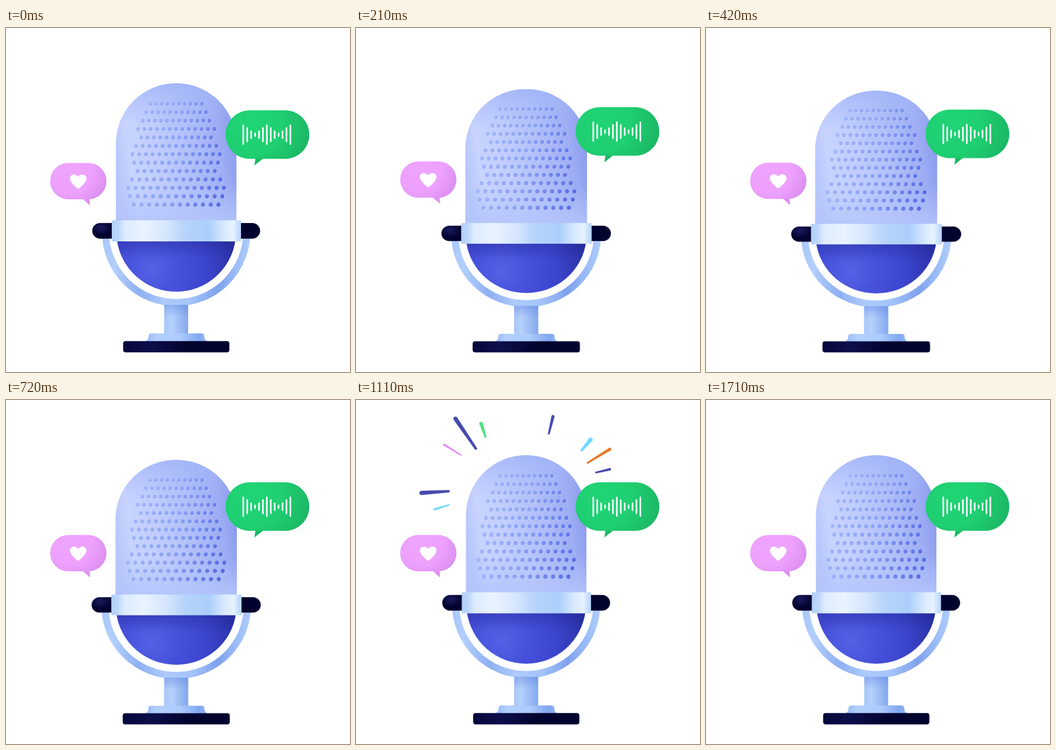
Recreate the animation shown at these times as an HTML page. Size 748 by 748 pixels, loop 1740 ms.

```html
<!DOCTYPE html>
<html lang="en">
<head>
<meta charset="utf-8">
<title>Microphone</title>
<style>
  html, body { margin: 0; width: 100%; height: 100%; overflow: hidden; background: #fff; }
  svg { display: block; width: 100vw; height: 100vh; }
  .mic, .bubble, .drift, .burst { animation: 1740ms linear infinite; }
  .mic { transform-origin: 370px 705px; animation-name: squash; }
  .bubble { animation-name: hop; }
  .drift, .burst { transform-origin: 370px 218px; }
  .drift { animation-name: drift; }
  .burst { animation-name: burst; }

  @keyframes squash {
    0% { transform: scale(1, 1); }
    15.517% { transform: scale(1.0127, .9726); }
    39.655% { transform: scale(1.0127, .9726); animation-timing-function: cubic-bezier(.3333, .6667, .6667, 1); }
    48.276%, 100% { transform: scale(1, 1); }
  }
  @keyframes hop {
    0%, 8.621% { transform: none; animation-timing-function: ease-in-out; }
    17.241% { transform: translateY(var(--hop)); animation-timing-function: ease-in-out; }
    25.862%, 100% { transform: none; }
  }
  @keyframes drift {
    0%, 41.379% { transform: scale(.876); animation-timing-function: cubic-bezier(.3333, .6667, .6667, 1); }
    100% { transform: scale(1.084); }
  }
  @keyframes burst {
    0%, 41.378% { transform: scale(.35); opacity: 0; }
    41.379% { transform: scale(.35); opacity: 1; animation-timing-function: cubic-bezier(.2, .7, .4, 1); }
    53.448%, 77.586% { transform: scale(1); opacity: 1; }
    97.701%, 100% { transform: scale(1); opacity: 0; }
  }
</style>
</head>
<body>
<svg viewBox="0 0 748 748" xmlns="http://www.w3.org/2000/svg">
  <defs>
    <linearGradient id="body" x1="0" y1=".58" x2="1" y2=".42">
      <stop offset="0" stop-color="#b7c7fc"/><stop offset=".12" stop-color="#c8d4ff"/>
      <stop offset=".34" stop-color="#c1cdfe"/><stop offset=".62" stop-color="#b0bff9"/>
      <stop offset=".86" stop-color="#9eadf4"/><stop offset="1" stop-color="#8b9bee"/>
    </linearGradient>
    <linearGradient id="bodyEnds" x2="0" y2="1">
      <stop offset="0" stop-color="#9fb3f8" stop-opacity=".7"/><stop offset=".3" stop-color="#a9bafa" stop-opacity="0"/>
      <stop offset=".72" stop-color="#b4c5fb" stop-opacity="0"/><stop offset="1" stop-color="#b4c5fb" stop-opacity=".85"/>
    </linearGradient>
    <linearGradient id="dot" gradientUnits="userSpaceOnUse" x1="262" x2="478" y1="250" y2="290">
      <stop offset="0" stop-color="#a5b9f9"/><stop offset=".5" stop-color="#8da3f4"/><stop offset="1" stop-color="#5a6de8"/>
    </linearGradient>
    <linearGradient id="band">
      <stop offset="0" stop-color="#b3cff9"/><stop offset=".05" stop-color="#bcd7fb"/>
      <stop offset=".1" stop-color="#deecff"/><stop offset=".25" stop-color="#eaf4ff"/>
      <stop offset=".42" stop-color="#d6e6fe"/><stop offset=".56" stop-color="#b8d5fb"/>
      <stop offset=".75" stop-color="#abcffa"/><stop offset=".88" stop-color="#dcecff"/>
      <stop offset=".94" stop-color="#e6f3ff"/><stop offset="1" stop-color="#b4d3fa"/>
    </linearGradient>
    <radialGradient id="bowl" gradientUnits="userSpaceOnUse" cx="315" cy="525" r="185">
      <stop offset="0" stop-color="#5462e6"/><stop offset=".35" stop-color="#4650da"/>
      <stop offset=".65" stop-color="#3c45cd"/><stop offset="1" stop-color="#2a31a6"/>
    </radialGradient>
    <linearGradient id="bowlShade" x2="0" y2="1">
      <stop offset="0" stop-color="#20278f" stop-opacity=".4"/><stop offset=".35" stop-color="#20278f" stop-opacity="0"/>
    </linearGradient>
    <linearGradient id="fork" gradientUnits="userSpaceOnUse" x1="209" x2="531" y1="0" y2="0">
      <stop offset="0" stop-color="#a9c7fa"/><stop offset=".08" stop-color="#b3cffc"/>
      <stop offset=".25" stop-color="#8fb0f2"/><stop offset=".42" stop-color="#aecbfc"/>
      <stop offset=".6" stop-color="#a5c4fa"/><stop offset=".78" stop-color="#7fa2ee"/>
      <stop offset=".92" stop-color="#9fc0f8"/><stop offset="1" stop-color="#b0cefc"/>
    </linearGradient>
    <linearGradient id="stem">
      <stop offset="0" stop-color="#a8c6f9"/><stop offset=".3" stop-color="#b6d1fc"/>
      <stop offset=".7" stop-color="#9abaf5"/><stop offset="1" stop-color="#84a7ee"/>
    </linearGradient>
    <linearGradient id="stemShade" x2="0" y2="1">
      <stop offset="0" stop-color="#5f87e4" stop-opacity=".45"/><stop offset=".4" stop-color="#5f87e4" stop-opacity="0"/>
    </linearGradient>
    <linearGradient id="foot">
      <stop offset="0" stop-color="#94b5f5"/><stop offset=".2" stop-color="#b3d0fd"/>
      <stop offset=".55" stop-color="#adccfc"/><stop offset=".85" stop-color="#82a7f0"/><stop offset="1" stop-color="#9bbcf7"/>
    </linearGradient>
    <radialGradient id="knob" cx=".4" cy=".28" r=".5">
      <stop offset="0" stop-color="#1a1b5c"/><stop offset="1" stop-color="#02022f"/>
    </radialGradient>
    <linearGradient id="base">
      <stop offset="0" stop-color="#05063a"/><stop offset=".25" stop-color="#0d0f4a"/><stop offset=".6" stop-color="#02032f"/>
    </linearGradient>
    <radialGradient id="green" gradientUnits="userSpaceOnUse" cx="535" cy="210" r="128">
      <stop offset="0" stop-color="#20d576"/><stop offset=".5" stop-color="#1fcf71"/><stop offset="1" stop-color="#1cb765"/>
    </radialGradient>
    <radialGradient id="pink" gradientUnits="userSpaceOnUse" cx="140" cy="310" r="90">
      <stop offset="0" stop-color="#efa4ff"/><stop offset=".55" stop-color="#eda1fd"/><stop offset="1" stop-color="#d98cee"/>
    </radialGradient>
    <path id="cup" d="M241 459.500A130 130 0 0 0 499 459.500Z"/>
    <path id="shell" d="M239 420V251A131 131 0 0 1 501 251V420Z"/>
    <rect id="post" x="344" y="602" width="52" height="65"/>
  </defs>

  <g class="drift"><g class="burst" id="rays"></g></g>

  <g class="mic">
    <path d="M216.500 443.500A153.500 153.500 0 0 0 523.500 443.500" fill="none" stroke="url(#fork)" stroke-width="15.500"/>
    <use href="#post" fill="url(#stem)"/>
    <use href="#post" fill="url(#stemShade)"/>
    <path d="M300 682Q310 680 310 670Q310 664 316 664H425Q431 664 431 670Q431 680 441 682Z" fill="url(#foot)"/>
    <rect x="254.700" y="680.700" width="231" height="24.500" rx="5" fill="url(#base)"/>
    <path d="M235 424H204.500A17 17 0 0 0 204.500 458H235Z" fill="url(#knob)"/>
    <path d="M505 424H535.500A17 17 0 0 1 535.500 458H505Z" fill="#02022f"/>
    <use href="#cup" fill="url(#bowl)"/>
    <use href="#cup" fill="url(#bowlShade)"/>
    <use href="#shell" fill="url(#body)"/>
    <use href="#shell" fill="url(#bodyEnds)"/>
    <g id="rim" fill="#d3deff" opacity=".65" transform="translate(1 1)"></g>
    <g id="dots" fill="url(#dot)"></g>
    <rect x="230" y="418" width="281" height="46" rx="1.500" fill="url(#band)"/>
  </g>

  <g class="bubble" style="--hop:-20px">
    <path d="M543 280L540 299L560 283Z" fill="#19bb65"/>
    <rect x="477.500" y="179" width="182" height="105.500" rx="52.700" fill="url(#green)"/>
    <path id="wave" stroke="#fff" stroke-width="3.400" stroke-linecap="round"/>
  </g>

  <g class="bubble" style="--hop:-10px">
    <path d="M166 371L183 386L181 367Z" fill="#dd92f1"/>
    <rect x="96" y="293.500" width="122.500" height="79" rx="39.500" fill="url(#pink)"/>
    <path d="M157 349.500C155 349.500 139 336 139 327.500C139 318 151.500 315.500 157 323.500C162.500 315.500 175 318 175 327.500C175 336 159 349.500 157 349.500Z" fill="#fff"/>
  </g>
</svg>
<script>
  const byId = id => document.getElementById(id);

  // Grille: dots per row, and x of the first dot; rows are centred on 370
  const counts = [10, 11, 12, 13, 12, 13, 14, 13, 12, 13, 14, 13, 12];
  const starts = [314, 305, 297.5, 287, 294, 282.5, 275, 279, 286, 274, 266, 269.5, 278];
  let grille = '';
  counts.forEach((n, row) => {
    const y = 165 + row * 18.27;
    for (let i = 0; i < n; i++) {
      const x = starts[row] + i * 2 * (370 - starts[row]) / (n - 1);
      const rx = 4.1 + row * .065 - Math.abs(x - 370) * .003;
      grille += `<ellipse cx="${x.toFixed(1)}" cy="${y.toFixed(1)}" rx="${rx.toFixed(2)}" ry="${(4.4 + row * .04).toFixed(2)}"/>`;
    }
  });
  byId('dots').innerHTML = byId('rim').innerHTML = grille;

  // Sound wave: bars shrink and grow with a period of six
  const half = [20.3, 14.5, 7.5, 3, 7.5, 14.5];
  byId('wave').setAttribute('d', Array.from({ length: 13 }, (_, i) => {
    const h = half[i % 6];
    return `M${516 + i * 8.53} ${232 - h}v${2 * h}`;
  }).join(''));

  // Rays: outer point, inner point, outer and inner radius, colour
  const indigo = '#464aae', sky = '#72d8ff';
  const rays = [
    [217, 41.5, 261, 106, 4.6, 2.8, indigo],
    [272.5, 52, 282, 81, 4, 2.2, '#55e084'],
    [193, 98, 229, 120, 2.5, 1.5, '#e291f2'],
    [143.5, 202, 202, 198.5, 4.6, 2.7, indigo],
    [172.5, 237.5, 203, 228, 2.6, 1.5, sky],
    [428, 37, 419, 74, 3.4, 2, indigo],
    [509.5, 87, 490, 110, 4.6, 2.4, sky],
    [551, 107.5, 503, 137, 3.3, 2, '#e67829'],
    [551, 151, 521, 158, 2.7, 1.8, indigo],
  ];
  byId('rays').innerHTML = rays.map(([x, y, u, v, r, q, color]) => {
    const len = Math.hypot(u - x, v - y), nx = (y - v) / len, ny = (u - x) / len;
    const at = (px, py, k) => `${px + nx * k} ${py + ny * k}`;
    return `<path fill="${color}" d="M${at(x, y, r)}L${at(u, v, q)}A${q} ${q} 0 0 0 ${at(u, v, -q)}` +
      `L${at(x, y, -r)}A${r} ${r} 0 0 0 ${at(x, y, r)}Z"/>`;
  }).join('');
</script>
</body>
</html>
```
